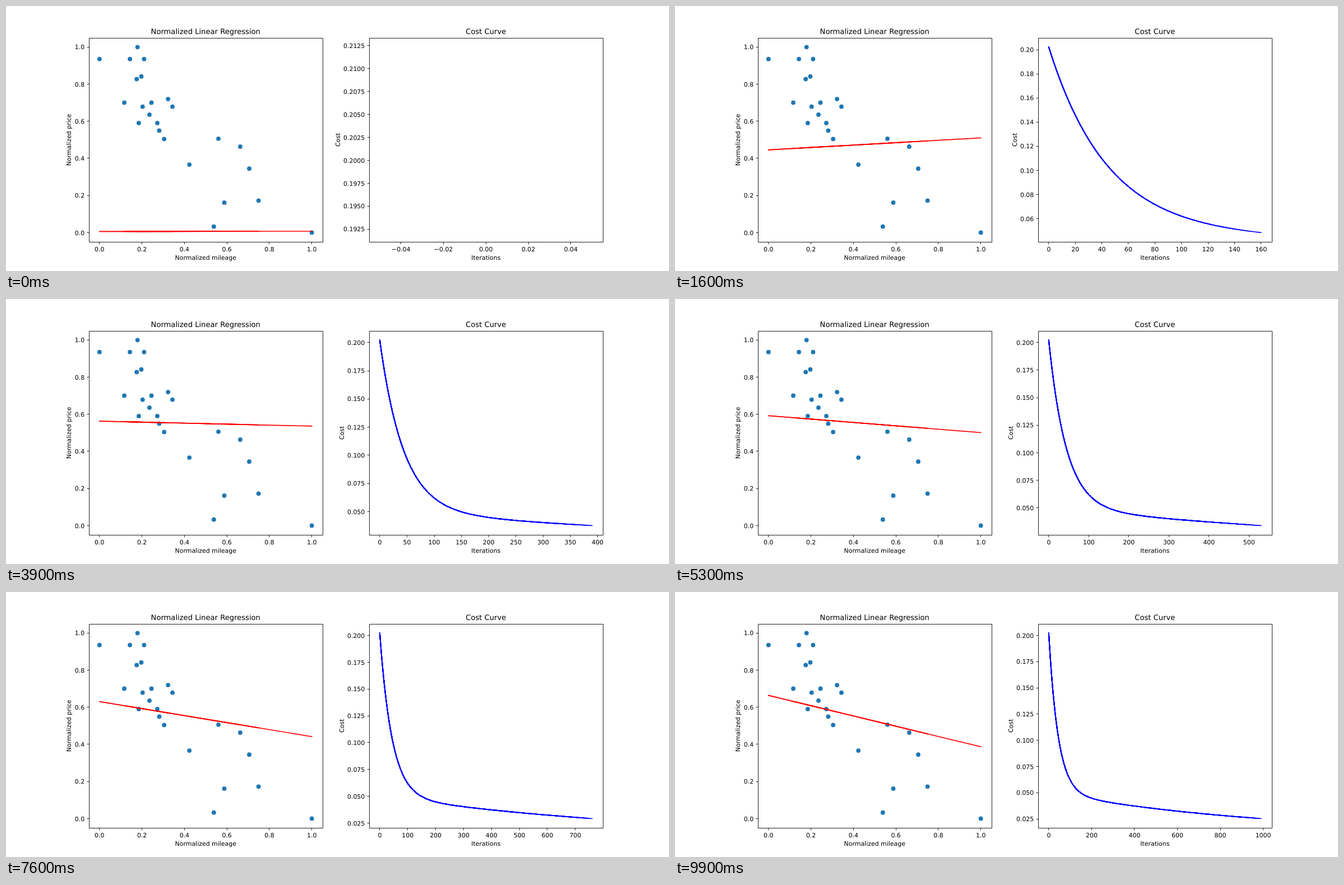
Animation, 1183 px wide and 473 px high, one loop 10 s. Source, as an HTML page:

```html
<!DOCTYPE html>
<html lang="en">
<head>
<meta charset="utf-8">
<title>Linear regression and cost curve</title>
<style>
  html, body { margin: 0; width: 100%; height: 100%; overflow: hidden; background: #fff; }
  svg { display: block; width: 1183px; height: 473px; }
  text { font-family: "DejaVu Sans", sans-serif; font-size: 10.95px; text-rendering: geometricPrecision; }
  .title { font-size: 13.14px; }
  .mid { text-anchor: middle; }
  .end { text-anchor: end; }
  .axis { fill: none; stroke: #000; stroke-width: .876; }
  .line { fill: none; stroke-width: 1.643; stroke-linecap: square; stroke-linejoin: round; }
  #fit { stroke: #f00; }
  #costs { stroke: #00f; }
  #costs path { vector-effect: non-scaling-stroke; }
  #dots { fill: #1f77b4; }
</style>
</head>
<body>
<svg viewBox="0 0 1183 473" xmlns="http://www.w3.org/2000/svg">
  <g id="dots"></g>
  <g id="fit" class="line"></g>
  <g id="costs" class="line"></g>
  <g id="left"></g>
  <g id="right"></g>
</svg>
<script>
const FRAME_MS = 100, FRAMES = 100, PER_FRAME = 10, RATE = 0.01;
const PT = 1183 / 15 / 72;
const TOP = 56.76, BOTTOM = 420.97, WIDTH = 416.74;
const LEFT_X = 147.88, RIGHT_X = 647.96;
const $ = id => document.getElementById(id);

// mileage, price
const cars = [
  [240000, 3650], [139800, 3800], [150500, 4400], [185530, 4450],
  [176000, 5250], [114800, 5350], [166800, 5800], [89000, 5990],
  [144500, 5999], [84000, 6200], [82029, 6390], [63060, 6390],
  [74000, 6600], [97500, 6800], [67000, 6800], [76025, 6900],
  [48235, 6900], [93000, 6990], [60949, 7490], [65674, 7555],
  [54000, 7990], [68500, 7990], [22899, 7990], [61789, 8290]
];
const data = cars.map(([km, price]) => [(km - 22899) / 217101, (price - 3650) / 4640]);

// Gradient descent: parameters and cost after every step
function train(steps) {
  const m = data.length, out = [];
  let a = 0, b = 0;
  for (let i = 0; i < steps; i++) {
    let ga = 0, gb = 0, cost = 0;
    for (const [x, y] of data) {
      const e = a + b * x - y;
      ga += e;
      gb += e * x;
    }
    a -= RATE * ga / m;
    b -= RATE * gb / m;
    for (const [x, y] of data) cost += (a + b * x - y) ** 2;
    out.push({ a, b, cost: cost / (2 * m) });
  }
  return out;
}
const history = train((FRAMES - 1) * PER_FRAME + 1);

// Limits with a 5% margin
function limits(lo, hi) {
  if (lo === hi) {
    const d = Math.abs(lo) * 0.05 || 0.05;
    lo -= d;
    hi += d;
  }
  const pad = (hi - lo) * 0.05;
  return [lo - pad, hi + pad];
}

function ticks([lo, hi]) {
  const raw = (hi - lo) / 9;
  const scale = 10 ** Math.floor(Math.log10(raw));
  const step = [1, 2, 2.5, 5, 10].find(s => s * scale >= raw) * scale;
  let digits = 0;
  while (Math.abs(step * 10 ** digits - Math.round(step * 10 ** digits)) > 1e-6) digits++;
  const list = [];
  for (let i = Math.ceil(lo / step); i * step <= hi; i++) {
    list.push({ v: i * step, label: (i * step).toFixed(digits).replace("-", "\u2212") });
  }
  return list;
}

function makeScale(x0, xlim, ylim) {
  const kx = WIDTH / (xlim[1] - xlim[0]);
  const ky = (TOP - BOTTOM) / (ylim[1] - ylim[0]);
  return {
    kx, ky,
    x: v => x0 + (v - xlim[0]) * kx,
    y: v => BOTTOM + (v - ylim[0]) * ky
  };
}

const snap = v => Math.round(v) + 0.5;
const text = (x, y, cls, str, extra = "") =>
  `<text x="${x}" y="${y}" class="${cls}" ${extra}>${str}</text>`;

function axes(x0, xlim, ylim, title, xname, yname) {
  const s = makeScale(x0, xlim, ylim);
  const l = snap(x0), r = snap(x0 + WIDTH), t = snap(TOP), b = snap(BOTTOM);
  const len = 3.5 * PT, mid = x0 + WIDTH / 2, vmid = (TOP + BOTTOM) / 2;
  let d = `M${l} ${t}H${r}V${b}H${l}Z`, labels = "", chars = 0;
  for (const { v, label } of ticks(xlim)) {
    const x = s.x(v);
    d += `M${Math.floor(x) + 0.5} ${b}v${len}`;
    labels += text(x, 438, "mid", label);
  }
  for (const { v, label } of ticks(ylim)) {
    const y = s.y(v);
    d += `M${l} ${Math.floor(y) + 0.5}h${-len}`;
    labels += text(x0 - 7 * PT, Math.round(y + 4.1), "end", label);
    chars = Math.max(chars, label.length);
  }
  // digits are .636 em wide, the point .318 em
  const labelWidth = ((chars - 1) * 0.636 + 0.318) * 10 * PT;
  const nameX = x0 - 11 * PT - labelWidth - 2;
  return `<path class="axis" d="${d}"/>` + labels +
    text(mid, 50, "title mid", title) +
    text(mid, 453, "mid", xname) +
    text(0, 0, "mid", yname, `transform="translate(${nameX} ${vmid}) rotate(-90)"`);
}

const unit = limits(0, 1);
const plot = makeScale(LEFT_X, unit, unit);

$("left").innerHTML = axes(LEFT_X, unit, unit,
  "Normalized Linear Regression", "Normalized mileage", "Normalized price");
$("dots").innerHTML = data.map(([x, y]) =>
  `<circle cx="${plot.x(x)}" cy="${plot.y(y)}" r="3.9"/>`).join("");

// Each frame adds one more, longer curve over the earlier ones
function buildCurves() {
  let d = "M0 " + history[0].cost, out = "";
  for (let i = 1; i < history.length; i++) {
    if (i < 200 || i % 5 === 0) d += `L${i} ${history[i].cost.toFixed(6)}`;
    if (i % PER_FRAME === 0) out += `<path d="${d}"/>`;
  }
  $("costs").innerHTML = out;
}
buildCurves();
const curves = [...$("costs").children];

function draw(k) {
  const n = k * PER_FRAME, { a, b, cost } = history[n];

  // The fit runs through the cars in list order, so strokes overlap
  const pts = data.map(([x]) => `${plot.x(x)} ${plot.y(a + b * x)}`);
  $("fit").innerHTML = pts.slice(1).map((p, i) => `<path d="M${pts[i]}L${p}"/>`).join("");

  const xlim = limits(0, n), ylim = limits(cost, history[0].cost);
  const s = makeScale(RIGHT_X, xlim, ylim);
  $("costs").setAttribute("transform", `matrix(${s.kx} 0 0 ${s.ky} ${s.x(0)} ${s.y(0)})`);
  curves.forEach((c, i) => c.setAttribute("display", i < k ? "inline" : "none"));
  $("right").innerHTML = axes(RIGHT_X, xlim, ylim, "Cost Curve", "Iterations", "Cost");
}

let shown = -1;
const start = performance.now();
function tick() {
  const k = Math.floor((performance.now() - start) / FRAME_MS) % FRAMES;
  if (k !== shown) draw(shown = k);
  requestAnimationFrame(tick);
}
tick();
</script>
</body>
</html>
```
